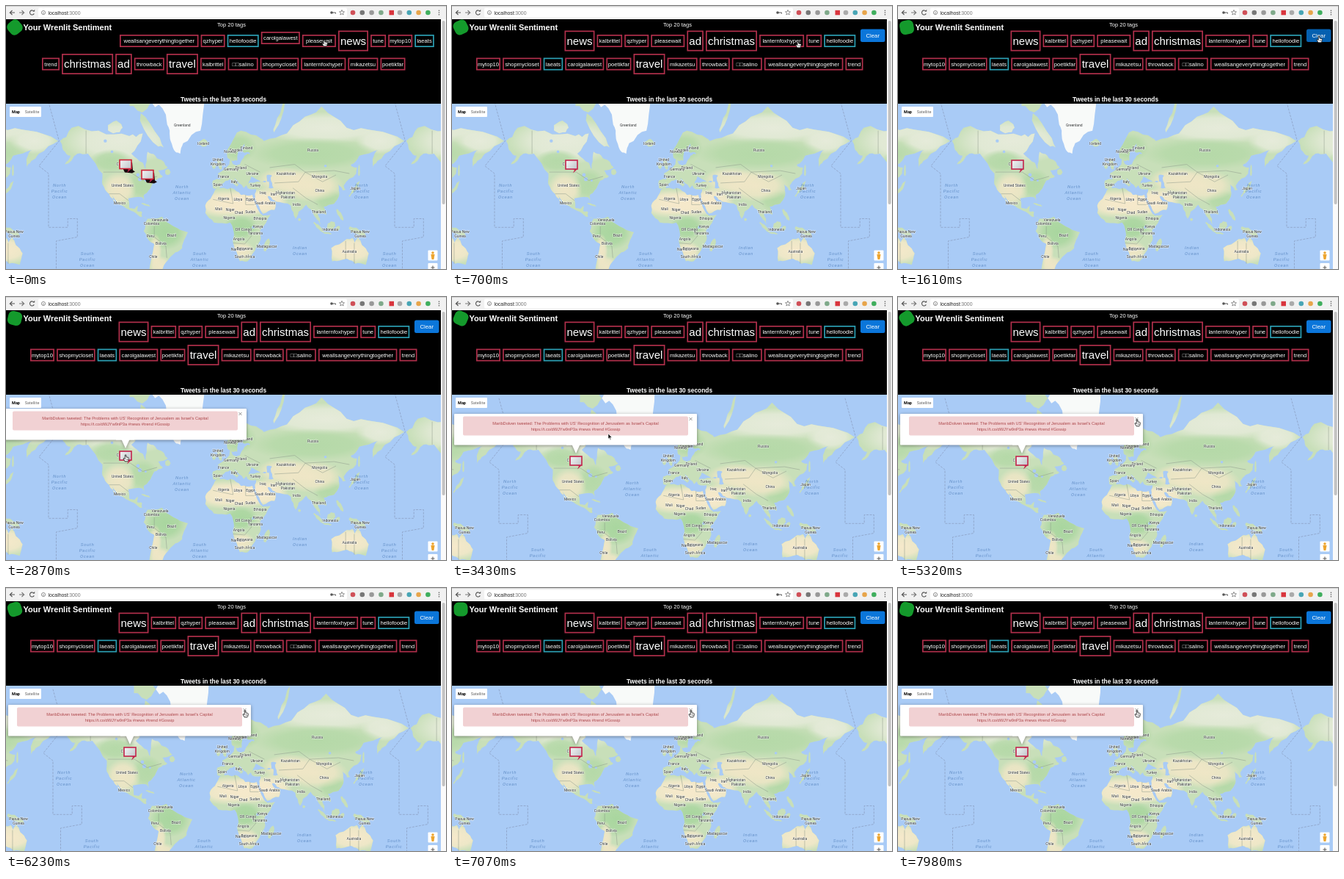
An HTML page with a canvas that plays this animation: 600 px wide and 358 px high, repeating every 8 s.

```html
<!DOCTYPE html>
<html lang="en">
<head>
<meta charset="utf-8">
<title>Tag sentiment map</title>
<style>
html, body { margin: 0; width: 100%; height: 100%; overflow: hidden; background: #000; }
canvas { display: block; width: 600px; height: 358px; }
</style>
</head>
<body>
<canvas id="stage" width="600" height="358"></canvas>
<script>
const LOOP = 8000;
const ctx = document.getElementById('stage').getContext('2d');
const SANS = '"Liberation Sans", Arial, sans-serif';
const MAP_FONT = 'Roboto, sans-serif';
const RED = '#b02f4b', TEAL = '#2c9fb3', WATER = '#a9cbf6';
const clamp = v => Math.max(0, Math.min(1, v));
const ease = v => { v = clamp(v); return v * v * (3 - 2 * v); };

function text(c, str, x, y, size, color, align = 'center', style = '', family = SANS) {
  c.font = `${style} ${size}px ${family}`;
  c.fillStyle = color;
  c.textAlign = align;
  c.textBaseline = 'alphabetic';
  c.fillText(str, x, y);
}
function rect(c, x, y, w, h, color, r = 0) {
  c.fillStyle = color;
  c.beginPath();
  c.roundRect(x, y, w, h, r);
  c.fill();
}
function disc(c, x, y, r, color) {
  c.fillStyle = color;
  c.beginPath();
  c.arc(x, y, r, 0, 7);
  c.fill();
}
function poly(c, pts, fill, stroke, width = 1) {
  c.beginPath();
  for (let i = 0; i < pts.length; i += 2) c.lineTo(pts[i], pts[i + 1]);
  c.closePath();
  if (fill) { c.fillStyle = fill; c.fill(); }
  if (stroke) { c.strokeStyle = stroke; c.lineWidth = width; c.stroke(); }
}
function line(c, pts, color, width) {
  c.beginPath();
  for (let i = 0; i < pts.length; i += 2) c.lineTo(pts[i], pts[i + 1]);
  c.strokeStyle = color;
  c.lineWidth = width;
  c.stroke();
}

// ---------- World map, Mercator ----------
const WORLD = 472, PX = WORLD / 360;
const mapX = lon => 294 + lon * PX;
const mapY = lat => 300 - WORLD / (2 * Math.PI) * Math.log(Math.tan(Math.PI / 4 + lat * Math.PI / 360));
const groups = s => s.split(' ').map(p => p.split(',').map(Number));

let seed = 11;
const rnd = () => (seed = seed * 16807 % 2147483647) / 2147483647;

// Rough coast: midpoint displacement between a few corner points
function coast(pts, depth = 2) {
  if (!depth) return pts;
  const out = [];
  pts.forEach((a, i) => {
    const b = pts[(i + 1) % pts.length];
    const dx = b[0] - a[0], dy = b[1] - a[1], len = Math.hypot(dx, dy) || 1;
    const off = (rnd() - 0.5) * Math.min(len * 0.25, 2) / len;
    out.push(a, [(a[0] + b[0]) / 2 - dy * off, (a[1] + b[1]) / 2 + dx * off]);
  });
  return coast(out, depth - 1);
}
function island([lon, lat, rx, ry, tilt]) {
  const ring = [], a = tilt * Math.PI / 180;
  for (let i = 0; i < 7; i++) {
    const k = i / 7 * 2 * Math.PI, u = rx * Math.cos(k), v = ry * Math.sin(k);
    ring.push([lon + u * Math.cos(a) - v * Math.sin(a), lat + u * Math.sin(a) + v * Math.cos(a)]);
  }
  return coast(ring, 1);
}

const northAmerica = groups('-168,66 -156,71 -128,70 -96,68 -82,69 -94,60 -82,55 -79,51 -77,61 -69,59 -61,56 -56,52 -66,50 -61,46 -70,43 -76,35 -81,31 -80,25 -83,29 -97,28 -96,19 -91,18 -87,21 -88,16 -83,15 -83,10 -77,8 -85,10 -94,16 -106,22 -114,31 -110,23 -117,32 -124,40 -124,48 -139,60 -150,60 -163,54 -157,59 -165,62');
const southAmerica = groups('-77,8 -62,10 -50,0 -35,-6 -39,-14 -41,-22 -48,-26 -58,-35 -65,-45 -76,-45 -70,-18 -76,-14 -81,-5');
const africa = groups('-6,36 10,37 20,31 32,31 39,15 43,11 51,12 40,-4 40,-15 35,-24 27,-34 19,-34 12,-17 13,-9 9,4 -8,4 -17,14 -17,21 -10,30');
const northEurasia = groups('-9,37 -9,43 -1,44 -4,48 8,54 9,57 12,54 19,54 24,59 30,60 22,61 24,65 17,61 16,56 12,56 6,58 6,62 20,70 41,67 34,66 44,66 68,69 81,73 104,77 130,71 160,70 190,66 170,60 162,56 157,51 157,57 163,62 143,59 135,54 120,45 55,45 47,47 47,42 41,42 31,46 28,41 23,37 13,45 18,40 16,38 9,44 0,40 -2,37');
const southAsia = groups('130,55 141,52 140,48 127,39 129,35 126,35 121,40 122,37 122,30 117,23 106,20 109,12 100,13 103,2 98,9 94,16 88,22 80,15 77,8 72,21 57,25 50,30 48,30 51,25 56,25 55,17 43,13 35,28 36,36 27,37 26,40 41,42 49,42 49,37 54,37 51,45 60,55');
const australia = groups('114,-22 130,-13 136,-12 138,-17 142,-11 146,-19 153,-27 150,-37 139,-36 131,-32 124,-33 115,-34');
const greenland = groups('-73,78 -58,75 -54,70 -53,66 -48,61 -43,60 -40,65 -22,70 -18,80 -60,82');
// lon, lat, half length, half height, tilt
const islands = groups('-73,69 14,2.5,-25 -111,71 8,2,0 -85,78 12,2,0 -56,49 3,2,0 -79,22 5,1,-15 -19,65 5,1.6,0 -2,54 4,2,-65 -8,53 2,2,0 47,-19 7,2.5,70 138,36 9,1.5,50 143,50 4,1,90 101,-1 8,1.8,-45 110,-7 5,1,-10 114,1 5,4,45 121,-2 3,2,60 141,-5 10,3,-25 123,12 7,2,-60 81,7 1.5,1.5,0 60,74 8,1.3,35'
  .replace(/(-?\d+,-?\d+) /g, (m, p, at, all) => /^[\d.]+,[\d.]+,/.test(all.slice(at + m.length)) ? p + ',' : m));

const LAND = [northAmerica, southAmerica, africa, northEurasia, southAsia, australia].map(s => coast(s))
  .concat(islands.map(island));

const BORDERS = [
  '-123,49 -95,49 -82,43 -67,46', '-117,32 -106,32 -97,26', '-141,70 -141,60', '50,52 76,54 87,49 117,50 133,48',
  '87,49 105,42 119,47', '55,41 80,42 87,49', '74,37 88,28 100,22', '-70,0 -70,-11 -58,-20 -57,-31',
  '25,31 25,22 34,22', '9,37 12,23 -9,27', '12,-17 24,-18 31,-10 30,0', '129,-15 129,-32', '138,-17 138,-36', '24,54 40,49'
].map(groups);
const DATE_LINE = groups('-180,78 -169,66 -190,53 -180,48 -180,-1 -160,-1 -160,8 -150,8 -150,-11 -172,-15 -172,-45');

// colour: lon, lat, x radius, y radius
const TINTS = {
  '#e6ebda': '-105,66,80,32 110,71,100,22 165,66,34,18',
  '#b5d9a8': '-115,56,30,16 -82,40,22,22 112,26,22,16 95,60,90,22 17,63,26,20',
  '#a9d69f': '-58,-6,28,24 20,-1,24,17',
  '#efe6c6': '-107,36,24,24 -69,-25,9,24 -64,-38,16,14 20,-25,20,14 66,43,40,18 92,39,46,22',
  '#f6e9cb': '3,23,46,20 27,24,36,20 48,25,28,20 133,-24,42,20'
};

const NORTH_LABELS = 'Greenland,-41,72;Iceland,-19,65;United States,-103,39;Mexico,-106,24;Finland,26,63;Sweden,15,62;Norway,9,61;Russia,95,62;Poland,20,52;Germany,10,51;Ukraine,32,48;France,2,46;Spain,-4,40;Italy,13,42;Turkey,35,39;Kazakhstan,67,48;Mongolia,102,46;China,102,35;Japan,139,37;Afghanistan,66,33;Pakistan,69,29;Iran,54,32;Iraq,43,33;Saudi Arabia,45,24;India,78,22;Thailand,101,15';
const SOUTH_LABELS = 'Venezuela,-64,7;Colombia,-73,3;Brazil,-52,-9;Peru,-74,-10;Bolivia,-63,-17;Chile,-71,-30;Egypt,30,27;Libya,17,27;Algeria,2,28;Mali,-3,18;Niger,9,17;Chad,18,14;Sudan,30,15;Nigeria,8,9;Ethiopia,40,8;Kenya,38,0;DR Congo,23,-3;Tanzania,35,-7;Angola,18,-13;Namibia,17,-23;Botswana,24,-22;South Africa,24,-30;Madagascar,47,-20;Indonesia,113,-3;Australia,133,-25';
const OCEANS = [
  ['North,Pacific,Ocean', 73, 246], ['North,Pacific,Ocean', 485, 246], ['North,Atlantic,Ocean', 240, 248],
  ['South,Pacific,Ocean', 111, 339], ['South,Pacific,Ocean', 523, 339], ['South,Atlantic,Ocean', 264, 339],
  ['Indian,Ocean', 401, 331]
];

function geoPath(shapes, close) {
  const path = new Path2D();
  for (const shift of [-WORLD, 0, WORLD]) for (const shape of shapes) {
    shape.forEach(([lon, lat], i) => path[i ? 'lineTo' : 'moveTo'](mapX(lon) + shift, mapY(lat)));
    if (close) path.closePath();
  }
  return path;
}

function tint(c, color, [lon, lat, rx, ry]) {
  for (const shift of [-WORLD, 0, WORLD]) {
    c.save();
    c.translate(mapX(lon) + shift, mapY(lat));
    c.scale(rx, ry);
    const g = c.createRadialGradient(0, 0, 0, 0, 0, 1);
    g.addColorStop(0, color);
    g.addColorStop(0.6, color + 'd0');
    g.addColorStop(1, color + '00');
    c.fillStyle = g;
    c.fillRect(-1, -1, 2, 2);
    c.restore();
  }
}

function buildMap() {
  const layer = document.createElement('canvas');
  layer.width = 640;
  layer.height = 260;
  const c = layer.getContext('2d');
  c.translate(20, -115);
  rect(c, -20, 115, 640, 260, WATER);
  const land = geoPath(LAND, true);
  c.fillStyle = '#c8dfb9';
  c.fill(land);
  c.save();
  c.clip(land);
  for (const color in TINTS) for (const spot of groups(TINTS[color])) tint(c, color, spot);
  c.restore();
  c.fillStyle = '#f8faf9';
  c.fill(geoPath([coast(greenland)], true));
  // Lakes
  for (const [lon, lat, r] of groups('-87,47,2.4 -85,44,2.6 -79,43,1.5 -98,52,2 -114,61,1.8 -121,66,2.2 33,-1,2 108,53,1.8'))
    disc(c, mapX(lon), mapY(lat), r, WATER);
  c.strokeStyle = '#8d998a';
  c.lineWidth = 0.5;
  c.stroke(geoPath(BORDERS, false));
  c.setLineDash([3, 1.5]);
  c.strokeStyle = '#8492b4';
  c.lineWidth = 0.6;
  c.stroke(geoPath([DATE_LINE], false));
  c.setLineDash([]);

  const label = (s, x, y) => {
    c.font = `5px ${MAP_FONT}`;
    c.textAlign = 'center';
    c.lineWidth = 1.2;
    c.strokeStyle = 'rgba(255,255,255,.65)';
    c.strokeText(s, x, y);
    text(c, s, x, y, 5, '#2f3433', 'center', '', MAP_FONT);
  };
  for (const entry of `${NORTH_LABELS};${SOUTH_LABELS}`.split(';')) {
    const [name, lon, lat] = entry.split(',');
    label(name, mapX(+lon), mapY(+lat) + 2);
  }
  label('Canada', 159, 217);
  ['United', 'Kingdom'].forEach((s, i) => label(s, 289, 211 + i * 5.5));
  for (const x of [11, 483]) ['Papua New', 'Guinea'].forEach((s, i) => label(s, x, 309 + i * 5.5));
  c.letterSpacing = '0.6px';
  for (const [name, x, y] of OCEANS)
    name.split(',').forEach((s, i) => text(c, s, x, y + i * 8, 6.2, '#6591c9', 'center', 'italic', MAP_FONT));
  return layer;
}
const mapLayer = buildMap();

// ---------- Tags: name -> box width ----------
const WIDTHS = {
  weallsangeverythingtogether: 107.5, qzhyper: 33, hellofoodie: 43, carolgalawest: 53, pleasewait: 46, news: 41,
  tune: 21, mytop10: 33, laeats: 26.5, trend: 24, christmas: 70, ad: 22.5, throwback: 41, travel: 43,
  kalbrittel: 34.5, '□□salino': 41, shopmycloset: 52.5, lanternfoxhyper: 61, mikazetsu: 41, poetikfar: 34
};
const BIG = ['news', 'christmas', 'ad', 'travel'], COOL = ['hellofoodie', 'laeats'];
const BEFORE = [
  [155, 47.5, 'weallsangeverythingtogether qzhyper hellofoodie carolgalawest pleasewait news tune mytop10 laeats'],
  [49, 79, 'trend christmas ad throwback travel kalbrittel □□salino shopmycloset lanternfoxhyper mikazetsu poetikfar']
];
const AFTER = [
  [153.5, 47.5, 'news kalbrittel qzhyper pleasewait ad christmas lanternfoxhyper tune hellofoodie'],
  [33, 79, 'mytop10 shopmycloset laeats carolgalawest poetikfar travel mikazetsu throwback □□salino weallsangeverythingtogether trend']
];
const CLICK = 700, OPEN = 2800;

function drawTags(t) {
  // Hovered tags float up a little
  const lift = {
    carolgalawest: 4 * (1 - ease(t / 150)),
    pleasewait: 5 * ease(t / 200) * (1 - ease((t - 250) / 200)),
    news: 5 * ease((t - 300) / 200)
  };
  for (const [x0, y0, names] of t < CLICK ? BEFORE : AFTER) {
    let x = x0;
    for (const name of names.split(' ')) {
      const w = WIDTHS[name], big = BIG.includes(name), h = big ? 28 : 17;
      const y = y0 - (t < CLICK ? lift[name] || 0 : 0);
      ctx.strokeStyle = COOL.includes(name) ? TEAL : RED;
      ctx.lineWidth = 1.7;
      ctx.strokeRect(x + 0.85, y - h / 2 + 0.85, w - 1.7, h - 1.7);
      text(ctx, name, x + w / 2, y + (big ? 5 : 2.6), big ? 15 : 7.6, '#fff');
      x += w + 3.1;
    }
  }
}

// ---------- Page parts ----------
function drawToolbar() {
  rect(ctx, 0, 0, 600, 18, '#f1f1f1');
  rect(ctx, 0, 0, 600, 1, '#d2d2d2');
  line(ctx, [12, 9, 5.5, 9, 8.5, 6, 5.5, 9, 8.5, 12], '#555', 1.1);
  line(ctx, [18, 9, 24.5, 9, 21.5, 6, 24.5, 9, 21.5, 12], '#777', 1.1);
  ctx.beginPath();
  ctx.arc(35.5, 9, 3, 0.4, 5.6);
  ctx.strokeStyle = '#555';
  ctx.stroke();
  poly(ctx, [36.5, 7.5, 39.2, 7.5, 39.2, 4.8], '#555');
  rect(ctx, 44, 2.5, 421, 13, '#fff', 2);
  ctx.beginPath();
  ctx.arc(51, 9, 2.6, 0, 7);
  ctx.strokeStyle = '#666';
  ctx.lineWidth = 0.7;
  ctx.stroke();
  line(ctx, [51, 8.4, 51, 10.6], '#666', 0.8);
  text(ctx, 'localhost', 57.5, 11.5, 6.9, '#222', 'left');
  text(ctx, ':3000', 101.5, 11.5, 6.9, '#777', 'right');
  disc(ctx, 444, 9, 1.8, '#555');
  line(ctx, [445, 9, 449.5, 9, 449.5, 10.5], '#555', 1);
  const star = [];
  for (let i = 0; i < 10; i++) {
    const r = i % 2 ? 1.6 : 3.7, a = i * Math.PI / 5 - Math.PI / 2;
    star.push(458 + r * Math.cos(a), 9 + r * Math.sin(a));
  }
  poly(ctx, star, null, '#666', 0.7);
  ['#cf5058', '#777', '#999', '#7fa98a', '#d9353d', '#aaa', '#48a5b5', '#e7a54b', '#3fae5d']
    .forEach((color, i) => i === 4 ? rect(ctx, 522.5, 5.8, 6.5, 6.5, color) : disc(ctx, 473 + i * 12.8, 9, 3.3, color));
  for (let i = 0; i < 3; i++) disc(ctx, 590.5, 6.2 + i * 2.8, 0.8, '#555');
}

function drawHeader(t) {
  rect(ctx, 0, 18, 593, 115, '#000');
  ctx.save();
  ctx.translate(12, 29);
  ctx.rotate((t * 0.018 - 39) * Math.PI / 180);
  rect(ctx, -9.5, -9.5, 19, 19, '#149a2c', 6.5);
  ctx.restore();
  text(ctx, 'Your Wrenlit Sentiment', 23.5, 32.5, 11, '#fff', 'left', 'bold');
  text(ctx, 'Top 20 tags', 307.5, 28, 7.5, '#fff');
  text(ctx, 'Tweets in the last 30 seconds', 296.5, 129.5, 8.4, '#fff', 'center', 'bold');
  drawTags(t);
  if (t >= CLICK) {
    rect(ctx, 557, 31.5, 33.5, 17.5, t > 1270 && t < 1900 ? '#0560b0' : '#0b76da', 2.5);
    text(ctx, 'Clear', 573.7, 43, 7.8, '#fff');
  }
}

function drawMarker(x, y, stacked) {
  if (stacked) poly(ctx, [x - 4, y + 5, x + 9, y - 3, x + 10, y + 8, x + 13, y + 10, x + 9, y + 12, x - 1, y + 11], '#17090d');
  poly(ctx, [x + 1, y + 6, x + 8, y + 6, x + 2, y + 11.5, x + 4, y + 7], '#c4234c');
  const g = ctx.createLinearGradient(x - 8, y - 6, x + 8, y + 6);
  g.addColorStop(0, '#f4f5f6');
  g.addColorStop(1, '#bfc5ca');
  ctx.fillStyle = g;
  ctx.fillRect(x - 8, y - 6, 16, 12);
  ctx.strokeStyle = stacked ? '#cf2339' : '#c4234c';
  ctx.lineWidth = 1.6;
  ctx.strokeRect(x - 8, y - 6, 16, 12);
}

function drawPopup() {
  ctx.save();
  ctx.shadowColor = 'rgba(0,0,0,.4)';
  ctx.shadowBlur = 4;
  ctx.shadowOffsetY = 1;
  rect(ctx, -3, 152, 331, 42.5, '#fff', 1);
  poly(ctx, [157.5, 194, 168.5, 194, 163, 206], '#fff');
  ctx.restore();
  rect(ctx, 150, 190, 25, 4.5, '#fff');
  rect(ctx, 9, 155.5, 307, 26, '#f1d1d3', 2);
  text(ctx, "MaribDolven tweeted: The Problems with US' Recognition of Jerusalem as Israel's Capital", 162.5, 167, 5.7, '#ad474b');
  text(ctx, 'https://t.co/dWJYw9nP3a #news #trend #Gossip', 162.5, 174.5, 5.7, '#ad474b');
  line(ctx, [317.5, 157, 321.5, 161], '#777', 0.8);
  line(ctx, [321.5, 157, 317.5, 161], '#777', 0.8);
}

function drawMap(t) {
  const pan = ease((t - 2890) / 280);
  ctx.save();
  ctx.beginPath();
  ctx.rect(0, 133, 593, 225);
  ctx.clip();
  ctx.translate(6 * pan, 7 * pan);
  ctx.drawImage(mapLayer, -20, 115);
  if (t < CLICK) {
    drawMarker(163, 215.5, true);
    drawMarker(193, 229.5, true);
  } else drawMarker(163, 216, false);
  if (t >= OPEN) drawPopup();
  ctx.restore();

  rect(ctx, 5, 137, 43, 14, '#fff', 1);
  text(ctx, 'Map', 13.5, 146.2, 5.5, '#000', 'center', 'bold', MAP_FONT);
  text(ctx, 'Satellite', 35.5, 146.2, 5.5, '#666', 'center', '', MAP_FONT);
  rect(ctx, 575.5, 332.5, 13, 14, '#fff', 1);
  disc(ctx, 582, 336, 1.8, '#eda52f');
  poly(ctx, [579.4, 338, 584.6, 338, 583.4, 345, 580.6, 345], '#eda52f');
  rect(ctx, 575.5, 350, 13, 10, '#fff', 1);
  line(ctx, [579.5, 356, 584.5, 356], '#666', 1.1);
  line(ctx, [582, 353.5, 582, 358], '#666', 1.1);
}

// time, x, y
const MOVES = [[0, 434, 46], [350, 470, 48], [800, 472, 48], [1350, 574, 41], [1850, 574, 41], [2550, 163, 215],
  [2900, 163, 215], [3380, 213, 186], [4000, 213, 186], [4700, 326, 167], [LOOP, 326, 167]];

function drawCursor(t) {
  const i = MOVES.findIndex(m => m[0] > t) - 1;
  const [t0, x0, y0] = MOVES[i], [t1, x1, y1] = MOVES[i + 1];
  const k = ease((t - t0) / (t1 - t0));
  ctx.save();
  ctx.translate(x0 + (x1 - x0) * k, y0 + (y1 - y0) * k);
  const hand = t < 850 || (t > 1220 && t < 1960) || (t > 2480 && t < 2960) || t > 4640;
  if (hand) {
    poly(ctx, [-0.7, 0, 0.8, 0, 1, 3, 3.8, 3.4, 4.4, 4.4, 3.8, 7.5, 3, 8.8, -1, 8.8, -3, 5, -2, 4.4, -0.8, 5.6], '#fff', '#111', 0.8);
    line(ctx, [1.1, 5, 1.1, 7], '#333', 0.5);
    line(ctx, [2.5, 5, 2.5, 7], '#333', 0.5);
  } else poly(ctx, [0, 0, 0, 7.2, 1.6, 5.7, 2.8, 8.4, 3.8, 7.9, 2.7, 5.3, 5, 5.2], '#000', '#fff', 0.6);
  ctx.restore();
}

function draw(now) {
  const t = now % LOOP;
  ctx.clearRect(0, 0, 600, 358);
  drawToolbar();
  drawHeader(t);
  drawMap(t);
  rect(ctx, 593, 18, 7, 340, '#fafafa');
  rect(ctx, 594.7, 20, 4, 250, '#c2c2c2', 2);
  drawCursor(t);
}

const start = performance.now();
function tick() {
  draw(performance.now() - start);
  requestAnimationFrame(tick);
}
tick();
</script>
</body>
</html>
```
